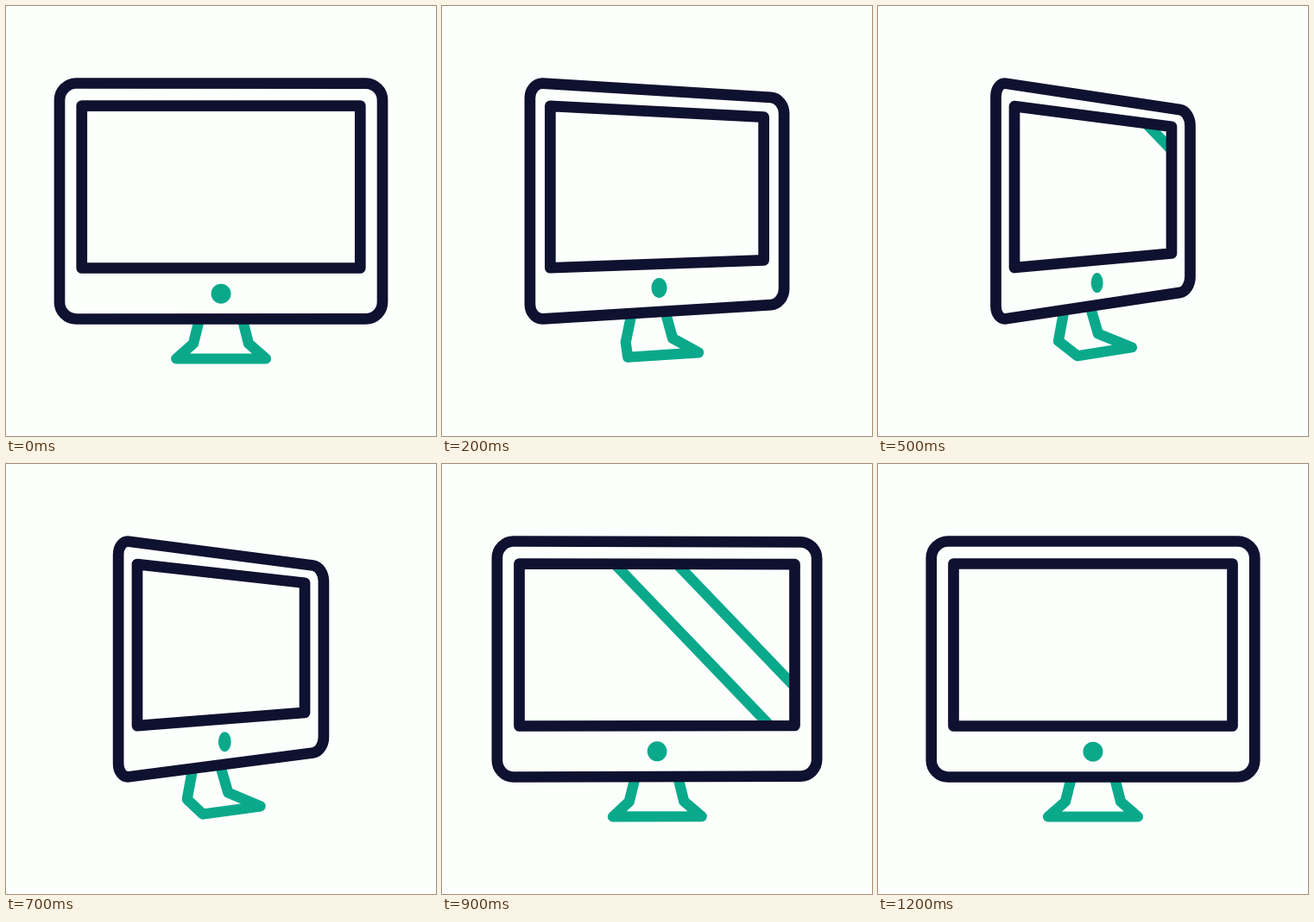
These frames come from a looping animation (498x498 px, 1250 ms). An HTML page:

```html
<!DOCTYPE html>
<html lang="en">
<head>
<meta charset="utf-8">
<title>Turning monitor</title>
<style>
  html, body { margin: 0; width: 100%; height: 100%; overflow: hidden; background: #fdfffc; }
  svg { display: block; width: 100%; height: 100%; }
  .navy, .green { fill: none; stroke-linejoin: round; }
  .navy { stroke: #0f1130; stroke-width: 12.7; }
  .green { stroke: #0aa98c; stroke-width: 12.2; }
</style>
</head>
<body>
<svg viewBox="0 0 498 498">
  <clipPath id="glass"><path id="pane"/></clipPath>
  <path id="stand" class="green"/>
  <g clip-path="url(#glass)"><path id="shine" class="green"/></g>
  <path id="bezel" class="navy"/>
  <path id="screen" class="navy"/>
  <ellipse id="dot" fill="#0aa98c"/>
</svg>
<script>
const LOOP = 1250, STEP = 50;
const CX = 249, HORIZON = 226, HALF = 187.25;

const set = (id, attrs) => {
  const node = document.getElementById(id);
  for (const name in attrs) node.setAttribute(name, attrs[name]);
};
const mix = (a, b, k) => a + (b - a) * k;
const smooth = (from, to, t) => {
  const x = Math.min(1, Math.max(0, (t - from) / (to - from)));
  return x * x * (3 - 2 * x);
};

// Height shrinks toward the right as the monitor turns (k from 0 to 1).
function project(dx, y, k) {
  const scale = 1 + k * (0.011 - 0.124 * (1 + dx / HALF));
  return HORIZON + (y - HORIZON) * scale;
}

// Turned rectangle with optional round corners; squeeze pulls its sides inward.
function frame(half, top, bottom, squeeze, r, k) {
  const corners = [[-half, top], [half, top], [half, bottom], [-half, bottom]]
    .map(([dx, y]) => [CX + dx - Math.sign(dx) * squeeze * k, project(dx, y, k)]);
  const rx = r * (1 - 0.4 * k), ry = r * (1 - 0.15 * k);
  const toward = ([ax, ay], [bx, by], i) => {
    const f = i % 2 ? ry / Math.abs(by - ay) : rx / Math.abs(bx - ax);
    return [mix(ax, bx, f), mix(ay, by, f)];
  };
  const parts = corners.map((c, i) => {
    const a = toward(c, corners[(i + 3) % 4], i + 1);
    const b = toward(c, corners[(i + 1) % 4], i);
    const pull = p => p.map((v, j) => mix(v, c[j], 0.55));
    return `${a}C${pull(a)} ${pull(b)} ${b}`;
  });
  return "M" + parts.join("L") + "Z";
}

// Foot outline, front and turned
const front = [[224, 363], [217, 391], [197, 408.5], [301, 408.5], [281, 391], [274, 363]];
const turned = [[215.5, 352], [209, 388], [231, 405.3], [294, 395.3], [255, 379.7], [246, 349]];
const foot = k => "M" + front.map((p, i) => p.map((v, j) => mix(v, turned[i][j], k))).join("L");

// Slanted line crossing y = 210 at x
const slant = x => `M${x - 144} 60L${x + 144} 360`;

function draw(t) {
  const k = smooth(-14, 394, t) - smooth(650, 928, t);
  const x = 722 - 1.75 * Math.abs(t - 674);
  const screen = frame(161.5, 115.5, 303.5, 70.5, 0, k);
  set("bezel", { d: frame(HALF, 89.5, 362.5, 74.75, 19.3, k) });
  set("screen", { d: screen });
  set("pane", { d: screen });
  set("stand", { d: foot(k) });
  set("shine", { d: slant(x - 36) + slant(x + 36) });
  set("dot", { cx: CX + 4.7 * k, cy: 333.2 - 12.6 * k, rx: 11.5 - 4.5 * k, ry: 11.5 });
}

const start = performance.now();
function tick() {
  const t = (performance.now() - start) % LOOP;
  draw(Math.floor(t / STEP) * STEP);
  requestAnimationFrame(tick);
}
tick();
</script>
</body>
</html>
```
